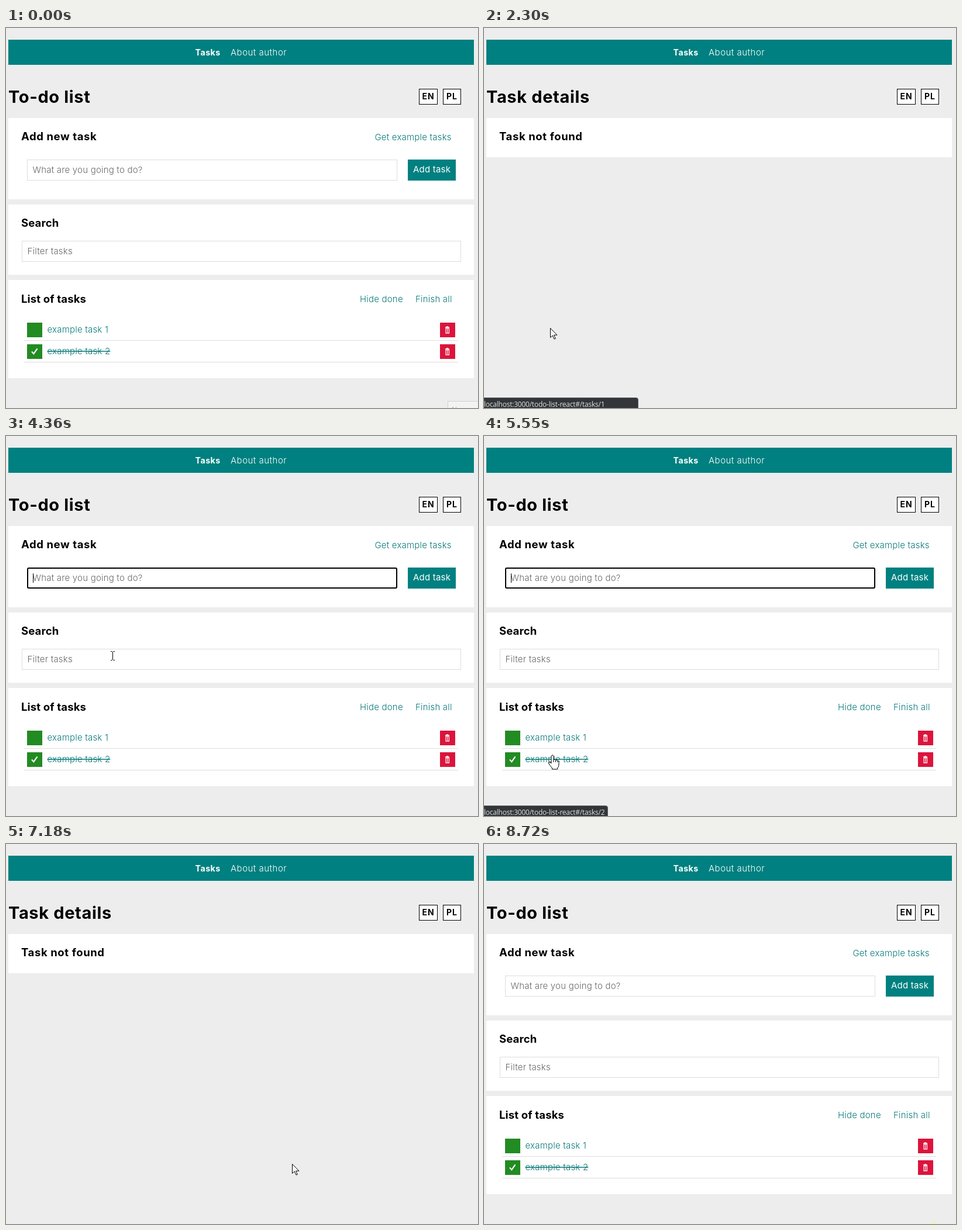
Recreate the animation shown at these times as an HTML page. Size 807 by 650 pixels, loop 8.81 s.

```html
<!DOCTYPE html>
<html lang="en">
<head>
<meta charset="utf-8">
<title>To-do list</title>
<style>
  html, body { margin: 0; width: 100%; height: 100%; overflow: hidden; background: #ededed; }
  svg { display: block; width: 100%; height: 100%; }
  text { font: 300 15px Inter, "Open Sans", sans-serif; letter-spacing: .2px; white-space: pre; }
  .nav { fill: #fff; letter-spacing: .5px; }
  .current { font-weight: 700; font-size: 14.2px; }
  .h1 { font-size: 29px; font-weight: 650; letter-spacing: .65px; }
  .h2 { font-size: 18.5px; font-weight: 650; letter-spacing: .6px; }
  .tight { letter-spacing: .15px; }
  .lang { font-size: 14px; font-weight: 650; letter-spacing: 1px; }
  .link { fill: #087878; }
  .hint { fill: #686868; }
  .button { fill: #fff; font-weight: 400; }
  .done { text-decoration: line-through; }
  .status { font: 12px "Open Sans", "Noto Sans", sans-serif; fill: #dcdfe2; letter-spacing: -.23px; }
  .field { fill: #fff; stroke: #ddd; }
  .outline { fill: #fff; stroke: #000; }
  .pointer { fill: #fff; stroke: #000; stroke-linejoin: round; }
</style>
</head>
<body>
<svg viewBox="0 0 807 650">
  <defs>
    <g id="bin">
      <rect width="26" height="25" fill="#dc143c"/>
      <path d="M9 8h7M11 7h3" stroke="#fff" stroke-width="1.4"/>
      <path d="M10 9.5v8.5h5.5v-8.5zM12.7 10v7" fill="none" stroke="#fbe3e8" stroke-width="1.3"/>
    </g>
  </defs>
  <rect width="807" height="650" fill="#ededed"/>
  <rect x="4" y="20" width="796" height="43" fill="#008080"/>
  <text x="323.5" y="47" class="nav current">Tasks</text>
  <text x="384" y="47" class="nav">About author</text>
  <rect x="706.5" y="104.5" width="31" height="26" class="outline"/>
  <rect x="747.5" y="104.5" width="30" height="26" class="outline"/>
  <text x="711.5" y="122" class="lang">EN</text>
  <text x="753" y="122" class="lang">PL</text>

  <g id="list">
    <text x="4" y="128" class="h1">To-do list</text>
    <path d="M4 154h796v139H4zM4 302h796v120H4zM4 431h796v168H4z" fill="#fff"/>
    <text x="26" y="192" class="h2">Add new task</text>
    <text x="630.5" y="192" class="link">Get example tasks</text>
    <rect x="36.5" y="225.5" width="632" height="35" class="field"/>
    <rect id="focus" x="37" y="226" width="631" height="34" rx="2" class="outline" stroke-width="2"/>
    <text x="45.5" y="248" class="hint">What are you going to do?</text>
    <path id="caret" d="M46.5 235v16" stroke="#000"/>
    <rect x="687" y="225" width="82" height="36" fill="#008080"/>
    <text x="696" y="247" class="button">Add task</text>
    <text x="26" y="340" class="h2 tight">Search</text>
    <rect x="27.5" y="364.5" width="750" height="35" class="field"/>
    <text x="36.5" y="387" class="hint">Filter tasks</text>
    <text x="26" y="470" class="h2 tight">List of tasks</text>
    <text x="605" y="469" class="link">Hide done</text>
    <text x="700" y="469" class="link">Finish all</text>
    <path d="M36 504h26v25H36zM36 541h26v25H36z" fill="#228b22"/>
    <path d="M44 553.5l3.3 3.8 6.2-9" fill="none" stroke="#fff" stroke-width="2.1"/>
    <text x="70.5" y="521" class="link">example task 1</text>
    <text x="70.5" y="558" class="link done">example task 2</text>
    <use href="#bin" x="742" y="504"/>
    <use href="#bin" x="742" y="541"/>
    <path d="M31 534.5h742M31 571.5h742" stroke="#ddd"/>
  </g>

  <g id="details">
    <text x="4" y="128" class="h1">Task details</text>
    <rect x="4" y="154" width="796" height="67" fill="#fff"/>
    <text x="26" y="192" class="h2">Task not found</text>
  </g>

  <g id="status">
    <rect id="statusBox" x="-5.5" y="632.5" height="30" rx="3.5" fill="#323639" stroke="#62666a"/>
    <text id="statusText" y="648" class="status"></text>
  </g>
  <g id="tooltip">
    <rect x="755.5" y="638.5" width="60" height="20" fill="#f3f3f3" stroke="#d0d0d0"/>
    <text x="762" y="657" class="status" style="fill:#aaa">New</text>
  </g>
  <ellipse id="glow" cx="768" cy="648" rx="4" ry="2.5" fill="#f2f1bd"/>

  <g id="cursor">
    <path id="arrow" class="pointer" d="M.5.5v16l3.7-3.5 2.9 6.2 2.2-1-2.8-6H12z"/>
    <g id="hand" class="pointer">
      <path d="M-2 1.5Q0-2 2 1.5V8Q4.500 6 5.500 8.500 8 7 8.800 9.500 11 9 11 11.500V16Q11 20 8.500 22V24H-.5V22Q-4 18-6 14.500-6.500 11-4 12L-2 14Z"/>
      <path d="M2 8v4M5.500 8.500v3.500M8.800 9.500V12" fill="none"/>
    </g>
    <path id="beam" d="M-3-7.500h2.500M1.500-7.500H4M.5-7V7M-3 7.500h2.500M1.500 7.500H4" fill="none" stroke="#000"/>
  </g>
</svg>
<script>
  const LOOP = 8810, STEP = 68.3;
  const $ = id => document.getElementById(id);
  const show = (id, on) => $(id).style.display = on ? "" : "none";
  const within = (v, from, to) => v >= from && v < to;
  const clamp = v => Math.max(0, Math.min(1, v));

  // Progress from one time to another, advancing once per screen capture.
  const ramp = (t, from, to) =>
    t < from ? 0 : clamp((Math.floor((t - from) / STEP + .01) + 1) / (Math.round((to - from) / STEP) + 1));
  const smooth = p => p * p * (3 - 2 * p);

  const moves = [
    [530, 1350, "M560 618C420 575 260 478 160 478S70 495 113 519"],
    [1620, 1690, "M113 519V513"],
    [2560, 3050, "M113 513C125 470 160 415 181 381"],
    [3280, 3350, "M181 381L182 376"],
    [4490, 5090, "M182 376C175 425 150 490 117 546"],
    [5970, 6650, "M117 546C200 598 300 598 380 600S500 620 493 567"],
    [6720, 6850, "M493 567L490 548"],
    [7180, 7180, "M490 548L489 547"],
    [7790, 8320, "M489 547C560 592 640 608 690 612S728 630 735 652"]
  ].map(([from, to, d]) => {
    const path = document.createElementNS("http://www.w3.org/2000/svg", "path");
    path.setAttribute("d", d);
    return { from, to, path, length: path.getTotalLength() };
  });

  function cursorAt(t) {
    const move = moves.filter(m => m.from <= t).pop();
    if (!move) return null;
    const p = smooth(ramp(t, move.from, move.to));
    return move.path.getPointAtLength(p * move.length);
  }

  function cursorKind(x, y, onList) {
    if (!onList) return "arrow";
    const onTask = within(x, 70, 180) && (within(y, 505, 529) || within(y, 541, 566));
    if (onTask) return "hand";
    return within(x, 27, 778) && within(y, 364, 400) ? "beam" : "arrow";
  }

  function drawStatus(t) {
    const second = t > 4000;
    const opacity = second
      ? ramp(t, 5350, 5480) - ramp(t, 5840, 6050)
      : ramp(t, 1620, 1890) - ramp(t, 2560, 2770);
    const width = second ? 212 : 213 + 51 * ramp(t, 2230, 2300);
    $("status").style.opacity = opacity;
    $("statusBox").setAttribute("width", width + 5);
    $("statusText").textContent = "localhost:3000/todo-list-react#/tasks/" + (second ? 2 : 1);
  }

  function draw(t) {
    const onList = !within(t, 2160, 4290) && !within(t, 5770, 7380);
    show("list", onList);
    show("details", !onList);

    const focused = within(t, 4290, 5620) || within(t, 7380, 8720);
    const blinkedOff = within(t, 4820, 5350) || within(t, 7900, 8390);
    show("focus", focused);
    show("caret", focused && !blinkedOff);

    show("tooltip", t < 70);
    show("glow", t >= 8720);
    drawStatus(t);

    const pos = cursorAt(t);
    show("cursor", pos && t < 8390);
    if (!pos) return;
    const x = Math.round(pos.x), y = Math.round(pos.y);
    const kind = cursorKind(x, y, onList);
    $("cursor").setAttribute("transform", `translate(${x} ${y})`);
    for (const id of ["arrow", "hand", "beam"]) show(id, id === kind);
  }

  const start = performance.now();
  function tick() {
    draw((performance.now() - start) % LOOP);
    requestAnimationFrame(tick);
  }
  tick();
</script>
</body>
</html>
```
